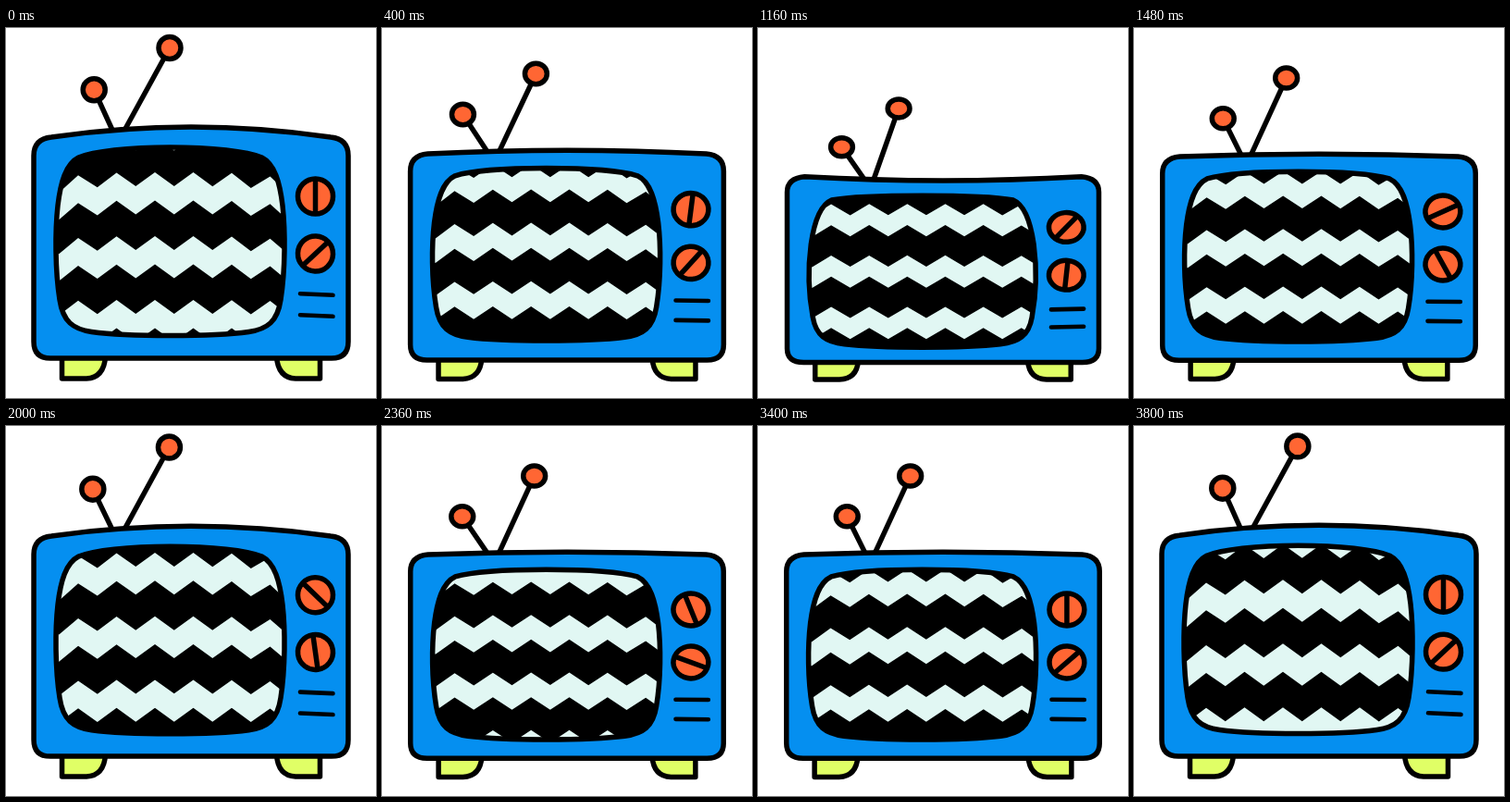
These frames come from a looping animation (400x400 px, 3.84 s). An HTML page:

```html
<!DOCTYPE html>
<html lang="en">
<head>
<meta charset="utf-8">
<title>Bouncing television</title>
<style>
  html, body { margin: 0; width: 100%; height: 100%; overflow: hidden; background: #fff; }
  svg { display: block; width: 100vw; height: 100vh; }
  .ink { stroke: #000; stroke-width: 5.5; stroke-linecap: round; stroke-linejoin: round; }
  .ink, .ink * { vector-effect: non-scaling-stroke; }
  .blue { fill: #058ff0; }
  .orange { fill: #ff6633; }
  .lime { fill: #e0ff66; }
  .pale { fill: #e1f7f3; }
  .hollow { fill: none; }
</style>
</head>
<body>
<svg viewBox="0 0 400 400">
  <defs><clipPath id="glass"><path id="hole"/></clipPath></defs>
  <g id="tv">
    <g class="ink lime">
      <path d="M60.5 355V379H87Q106 378 107.5 355"/>
      <path d="M339.5 355V379H313Q294 378 292.5 355"/>
    </g>
    <path id="rods" class="ink hollow"/>
    <circle id="ballL" class="ink orange" r="12"/>
    <circle id="ballR" class="ink orange" r="12"/>
    <path id="body" class="ink blue"/>
    <path id="screen"/>
    <g clip-path="url(#glass)"><path id="waves" class="pale"/></g>
    <path id="rim" class="ink hollow"/>
    <g id="knob1" class="ink orange"><circle r="19"/><path d="M0-18V18"/></g>
    <g id="knob2" class="ink orange"><circle r="19"/><path d="M0-18V18"/></g>
    <path id="vents" class="ink hollow" style="stroke-width:4.6"/>
  </g>
</svg>
<script>
const LOOP = 3840, BOUNCE = 1920, STEP = 40;
const WAVE = { gap: 69, width: 41.5, drop: 15, top: 156 };
const TIMES = [0, 840, 1480, 2000, 2760, 3400, 3840];
const TURN1 = [0, 23, 64, 134, 175, 180, 180];
const TURN2 = [47, 24, -27, -188, -290, -313, -313];

const $ = id => document.getElementById(id);
const set = (id, attrs) => {
  for (const name in attrs) $(id).setAttribute(name, attrs[name]);
};

// Squash amount: 0 tall, 1 flat
function squash(t) {
  const u = (t % BOUNCE) / BOUNCE * 2;
  const s = u < 1 ? u : 2 - u;
  return s * s * (3 - 2 * s);
}

// Monotone cubic through the given values
function glide(values, t) {
  const slope = i => (values[i + 1] - values[i]) / (TIMES[i + 1] - TIMES[i]);
  const tangent = i => {
    if (i === 0 || i === values.length - 1) return 0;
    const a = slope(i - 1), b = slope(i);
    return a * b > 0 ? 2 * a * b / (a + b) : 0;
  };
  let i = 0;
  while (i < TIMES.length - 2 && t >= TIMES[i + 1]) i++;
  const d = TIMES[i + 1] - TIMES[i], u = (t - TIMES[i]) / d;
  const ease = u * u * (3 - 2 * u);
  return values[i] + (values[i + 1] - values[i]) * ease
    + d * u * (1 - u) * (tangent(i) * (1 - u) - tangent(i + 1) * u);
}

function bodyPath(k) {
  const edge = 118 - 1.5 * k, mid = 107 + 16.5 * k;
  return `M30 ${edge + 20}Q30 ${edge + 2} 49 ${edge}Q200 ${2 * mid - edge} 351 ${edge}` +
    `Q370 ${edge + 2} 370 ${edge + 20}V339Q370 357 352 357H48Q30 357 30 339Z`;
}

function screenPath(top, bottom, sag) {
  const half = [
    [0, top], [45, top], [83, top + sag * .4], [99, top + sag],
    [113, top + sag + 7], [118.5, top + 38], [121.5, top + 63],
    [124.5, top + 90], [124.5, bottom - 71], [119.5, bottom - 39],
    [116, bottom - 15], [105, bottom - 7], [85, bottom - 4],
    [56, bottom], [28, bottom], [0, bottom]
  ];
  const back = half.map(([x, y]) => [-x, y]).reverse().slice(1);
  const pts = [...half, ...back].map(([x, y]) => `${177.5 + x} ${y}`);
  return `M${pts[0]}C${pts.slice(1).join(' ')}Z`;
}

function wavesPath(t, k) {
  const { gap, width, drop, top } = WAVE;
  const thick = 30.5 - 2.5 * k;
  const shift = 7 * t / BOUNCE % 1 * gap;
  const xs = Array.from({ length: 15 }, (_, i) => i);
  // The ends droop with the bulge of the glass, most at the top
  const point = (i, y) => {
    const x = 36.5 + i * width / 2;
    const droop = 8 * (1 - k) * Math.max(0, (332 - y) / 203) * ((x - 177.5) / 120) ** 4;
    return `${x} ${y + i % 2 * drop + droop}`;
  };
  let d = '';
  for (let n = -2; n < 5; n++) {
    const y = top - shift + n * gap;
    const line = dy => xs.map(i => point(i, y + dy));
    d += `M${line(0).join('L')}L${line(thick).reverse().join('L')}Z`;
  }
  return d;
}

function draw(t) {
  const k = squash(t), phase = 2 * Math.PI * t / BOUNCE;
  const sx = 1 - .01 * k, sy = 1 - .1855 * k;
  set('tv', { transform: `translate(200 385) scale(${sx} ${sy}) translate(-200 -385)` });

  const left = { cx: 90.4 + 4.8 * Math.cos(phase) - 4.8 * Math.sin(phase), cy: 66.8 + 12.8 * k };
  const right = { cx: 177 - 28.5 * k, cy: 21.5 + 7.5 * k };
  const base = `121 ${123.5 + 9 * k}`;
  set('ballL', left);
  set('ballR', right);
  set('rods', { d: `M${left.cx} ${left.cy}L${base}L${right.cx} ${right.cy}` });
  set('body', { d: bodyPath(k) });

  const top = 129 + 13.6 * k, bottom = 332.5 + 5.5 * k;
  const d = screenPath(top, bottom, 11 - 6 * k);
  for (const id of ['hole', 'screen', 'rim']) set(id, { d });
  set('waves', {
    d: wavesPath(t, k),
    transform: `translate(0 ${top}) scale(1 ${(bottom - top) / 203.5}) translate(0 -129)`
  });

  set('knob1', { transform: `translate(334.5 182) rotate(${glide(TURN1, t)})` });
  set('knob2', { transform: `translate(334.5 244) rotate(${glide(TURN2, t)})` });
  const tilt = .8 - 1.4 * k;
  set('vents', {
    d: [288, 311].map(y => `M318 ${y - tilt}L353.5 ${y + tilt}`).join('')
  });
}

const start = performance.now();
function tick(now) {
  const t = Math.max(0, now - start) % LOOP;
  draw(Math.floor(t / STEP) * STEP);
  requestAnimationFrame(tick);
}
draw(0);
requestAnimationFrame(tick);
</script>
</body>
</html>
```
